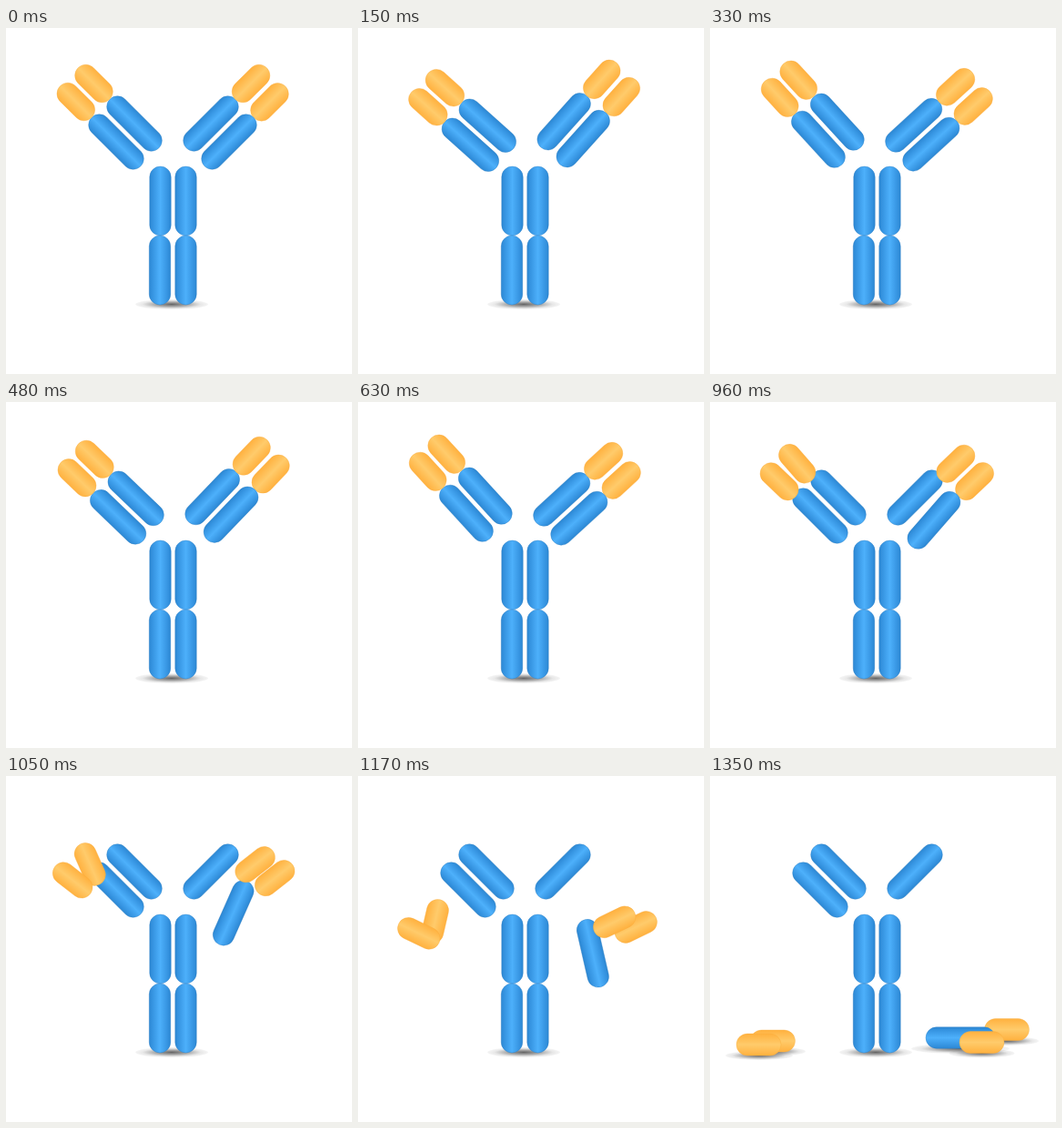
Write an HTML page that moves like this. It is 380 px wide and 380 px high and loops after 2.71 s.

```html
<!DOCTYPE html>
<html lang="en">
<head>
<meta charset="utf-8">
<title>Antibody</title>
<style>
  html, body { margin: 0; width: 100%; height: 100%; overflow: hidden; background: #fff; }
  svg { display: block; width: 100%; height: 100%; }
</style>
</head>
<body>
<svg id="stage" viewBox="0 0 380 380">
  <defs>
    <linearGradient id="blue" x1="0" y1="0" x2="0" y2="1">
      <stop offset="0" stop-color="#2c87d2"/>
      <stop offset=".14" stop-color="#3593e0"/>
      <stop offset=".5" stop-color="#4db0fb"/>
      <stop offset=".86" stop-color="#3593e0"/>
      <stop offset="1" stop-color="#2c87d2"/>
    </linearGradient>
    <linearGradient id="gold" x1="0" y1="0" x2="0" y2="1">
      <stop offset="0" stop-color="#ffb13f"/>
      <stop offset=".5" stop-color="#ffcb6b"/>
      <stop offset="1" stop-color="#ffb13f"/>
    </linearGradient>
    <radialGradient id="shade">
      <stop offset="0" stop-color="#000" stop-opacity=".6"/>
      <stop offset=".5" stop-color="#000" stop-opacity=".3"/>
      <stop offset=".8" stop-color="#000" stop-opacity=".09"/>
      <stop offset="1" stop-color="#000" stop-opacity=".04"/>
    </radialGradient>
  </defs>
</svg>
<script>
const LOOP = 2710, STEP = 30, SHAKE_END = 900, FALL = 450, SHAKE = 300;
const stage = document.getElementById('stage');
const sizes = { blue: [76, 23.5], gold: [49, 24] };
const edges = { blue: '#2377be', gold: '#f9aa3a' };

function add(parent, tag, attrs) {
  const el = document.createElementNS('http://www.w3.org/2000/svg', tag);
  for (const key in attrs) el.setAttribute(key, attrs[key]);
  return parent.appendChild(el);
}

const addShadow = (parent, cx, cy, rx, ry) =>
  add(parent, 'ellipse', { cx, cy, rx, ry, fill: 'url(#shade)' });

function addCapsule(parent, kind) {
  const [w, h] = sizes[kind];
  return add(parent, 'rect', {
    x: -w / 2, y: -h / 2, width: w, height: h, rx: h / 2,
    fill: `url(#${kind})`, stroke: edges[kind],
    'stroke-width': .6, 'stroke-opacity': .6
  });
}

function place(el, [x, y, angle]) {
  el.setAttribute('transform', `translate(${x} ${y}) rotate(${angle})`);
}

addShadow(stage, 182, 303.5, 40, 5.5);
const floor = add(stage, 'g', {});
addShadow(floor, 69, 302.5, 36, 5);
addShadow(floor, 54, 307, 37, 5);
addShadow(floor, 326, 291, 35, 5);
addShadow(floor, 275, 299.5, 54, 5.5);
addShadow(floor, 298.5, 304.5, 36, 5);

for (const [x, y] of [[169.5, 190], [197.5, 190], [169, 266], [197.5, 266]])
  place(addCapsule(stage, 'blue'), [x, y, 90]);

// Poses are [centre x, centre y, angle]; parts with "to" break off and fall.
const arms = add(stage, 'g', {});
const parts = [
  { kind: 'blue', from: [141, 105, 45] },
  { kind: 'blue', from: [121, 125, 45] },
  { kind: 'blue', from: [225, 105, -45] },
  { kind: 'gold', from: [96.5, 61, 45], to: [69, 291, 180] },
  { kind: 'gold', from: [76.8, 81, 45], to: [53.5, 295, 0] },
  { kind: 'gold', from: [289.5, 81.3, -45], to: [326, 278.5, 0] },
  { kind: 'blue', from: [245, 125, 135], to: [275, 287.5, 0] },
  { kind: 'gold', from: [269, 61, -45], to: [298.5, 292.5, 0] }
];
for (const part of parts) part.el = addCapsule(arms, part.kind);

const clamp = v => Math.min(1, Math.max(0, v));
const mix = (a, b, k) => a + (b - a) * k;

// cubic-bezier(.42, 0, 1, 1)
function easeIn(x) {
  let lo = 0, hi = 1;
  for (let i = 0; i < 24; i++) {
    const s = (lo + hi) / 2, r = 1 - s;
    if (1.26 * r * r * s + 3 * r * s * s + s * s * s < x) lo = s; else hi = s;
  }
  return lo * lo * (3 - 2 * lo);
}

function along(keys, p) {
  const pos = p * (keys.length - 1), i = Math.floor(pos);
  return mix(keys[i], keys[Math.min(i + 1, keys.length - 1)], pos - i);
}

const tilt = [0, 5, -5, -1.2, 4, 0];
const shift = [0, -1.8, .1, 1.5, -1, 0];

function draw(time) {
  const t = Math.min(Math.floor(time / STEP) * STEP, SHAKE_END + FALL);
  const phase = t < SHAKE_END ? (t % SHAKE) / SHAKE : 0;
  arms.setAttribute('transform',
    `translate(${along(shift, phase)} 0) rotate(${along(tilt, phase)} 183 97)`);

  const fall = easeIn(clamp((t - SHAKE_END) / FALL));
  for (const { el, from, to } of parts)
    place(el, to ? from.map((v, i) => mix(v, to[i], fall)) : from);
  floor.setAttribute('opacity', clamp((fall - .5) / .5));
}

const start = performance.now();
function tick() {
  draw((performance.now() - start) % LOOP);
  requestAnimationFrame(tick);
}
tick();
</script>
</body>
</html>
```
